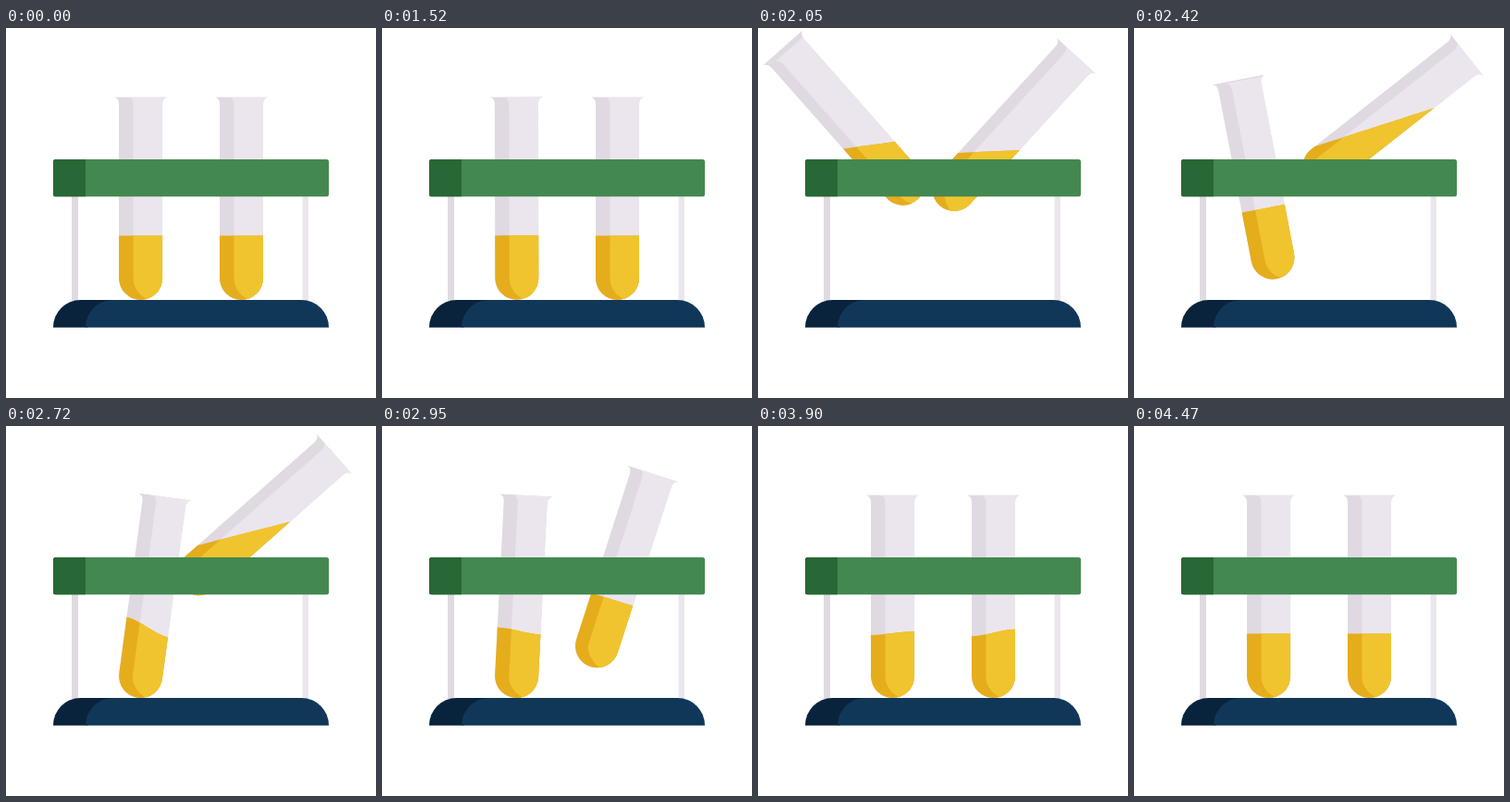
These frames come from a looping animation (400 by 400 pixels, 4.52 s). An HTML page:

```html
<!DOCTYPE html>
<html lang="en">
<head>
<meta charset="utf-8">
<title>Test tubes</title>
<style>
  html, body { margin: 0; width: 100%; height: 100%; overflow: hidden; background: #fff; }
  svg { display: block; width: 100%; height: 100%; }
</style>
</head>
<body>
<svg viewBox="0 0 400 400">
  <defs>
    <clipPath id="tube">
      <path d="M-29-196H29Q23.5-194.5 23.5-188V0A23.5 23.5 0 0 1-23.5 0V-188Q-23.5-194.5-29-196Z"/>
    </clipPath>
  </defs>
  <path fill="#e0d9e2" d="M71 180h7v115h-7z"/>
  <path fill="#ebe6ee" d="M320.5 180h6.500v115h-6.500z"/>
  <path fill="#08233b" d="M51 323.700A29.500 29.700 0 0 1 80.500 294H115.500L88 323.700Z"/>
  <path fill="#113758" d="M86 323.700A29.500 29.700 0 0 1 115.500 294H319.500A29.500 29.700 0 0 1 349 323.700Z"/>
  <g id="tubes"></g>
  <rect x="51" y="142" width="298" height="40.300" rx="2.500" fill="#438851"/>
  <path fill="#286736" d="M86 142H53.500A2.500 2.500 0 0 0 51 144.500V179.800A2.500 2.500 0 0 0 53.500 182.300H86Z"/>
</svg>
<script>
const LOOP = 4520, START = 1520, END = 4470;
const HOME_Y = 270.5, HALF = 23.5, LEVEL = -46;
const FALL = 520, SWING = 590, RETURN = 480, OVERSHOOT = 7.9;

// rush > 1 makes the rise quick at first and slow near its peak;
// pour is the slope of the liquid at full tilt.
const tubes = [
  { x: 145.6, dx: 11, dy: -103, tilt: -41.7, start: 1500, peak: 2080, rush: 1, pour: .68 },
  { x: 254.5, dx: -49, dy: -121, tilt: 52, start: 1520, peak: 2630, rush: 1.95, pour: -2.75 }
];

const unit = v => Math.min(1, Math.max(0, v));
const ease = u => (1 - Math.cos(Math.PI * unit(u))) / 2;

function liftOf(tube, t) {
  if (t > tube.peak) return 1 - ease((t - tube.peak) / FALL);
  const u = unit((t - tube.start) / (tube.peak - tube.start));
  return ease(1 - (1 - u) ** tube.rush);
}

function angleOf(tube, t) {
  if (t < tube.peak) return tube.tilt * liftOf(tube, t);
  const over = -Math.sign(tube.tilt) * OVERSHOOT, since = t - tube.peak;
  if (since < SWING) return tube.tilt + (over - tube.tilt) * ease(since / SWING);
  return over * (1 - ease((since - SWING) / RETURN));
}

// The liquid leans while the tube is tilted, then rocks until it is calm.
function slopeOf(tube, t, angle) {
  const lean = tube.pour * Math.max(0, angle / tube.tilt) ** 5;
  const calmFrom = tube.peak + 485;
  const fade = unit((t - calmFrom) / (END - calmFrom));
  const rock = fade ? .38 * (1 - fade ** 3) * Math.sin(Math.PI * (t - calmFrom) / 430) : 0;
  return lean + rock;
}

function levelOf(tube, t, slope) {
  const u = unit((t - tube.start) / (tube.peak + 1200 - tube.start));
  return LEVEL - 6 * Math.abs(slope) - 8 * Math.sin(Math.PI * u) ** 2;
}

// The lit side widens with the tilt, and its round end shifts sideways.
function litPath(angle) {
  const rim = Math.max(0, -angle) * .14, top = -196 + rim;
  const edge = -8 - .08 * Math.abs(angle), tip = 15.5 + .35 * angle;
  return `M${edge - 5.5} ${top}H60V24H${tip}C${tip - 13} 24 ${edge} 13 ${edge} 0`
    + `V${top + 8}Q${edge} ${top + 1.5} ${edge - 5.5} ${top}Z`;
}

// Small waves form an S curve, steep surfaces are straight.
function liquidPath(slope, level) {
  const drop = slope * HALF, reach = 18;
  const bend = slope * reach * Math.min(1, Math.abs(slope) / .7);
  const left = level - drop, right = level + drop;
  return `M-30 ${left}H${-HALF}C${reach - HALF} ${left + bend} ${HALF - reach} ${right - bend} ${HALF} ${right}H30V24H-30Z`;
}

function buildTube(tube, index) {
  tube.group = document.createElementNS("http://www.w3.org/2000/svg", "g");
  tube.group.innerHTML = `
    <clipPath id="lit${index}"><path class="lit"/></clipPath>
    <g clip-path="url(#tube)">
      <path fill="#e0d9e2" d="M-30-197H30V24H-30Z"/>
      <path class="lit" fill="#ebe6ee"/>
      <path class="liquid" fill="#e5ad1c"/>
      <g clip-path="url(#lit${index})"><path class="liquid" fill="#f0c42e"/></g>
    </g>`;
  document.getElementById("tubes").append(tube.group);
}

function setPaths(group, selector, d) {
  group.querySelectorAll(selector).forEach(path => path.setAttribute("d", d));
}

function drawTube(tube, t) {
  const lift = liftOf(tube, t), angle = angleOf(tube, t), slope = slopeOf(tube, t, angle);
  const x = tube.x + tube.dx * lift ** .7, y = HOME_Y + tube.dy * lift ** 1.15;
  tube.group.setAttribute("transform", `translate(${x} ${y}) rotate(${angle})`);
  setPaths(tube.group, ".lit", litPath(angle));
  setPaths(tube.group, ".liquid", liquidPath(slope, levelOf(tube, t, slope)));
}

function render(time) {
  const t = time % LOOP;
  const moment = t < START || t >= END ? 0 : t;
  tubes.forEach(tube => drawTube(tube, moment));
}

tubes.forEach(buildTube);
render(0);
const begin = performance.now();
(function tick() {
  render(performance.now() - begin);
  requestAnimationFrame(tick);
})();
</script>
</body>
</html>
```
